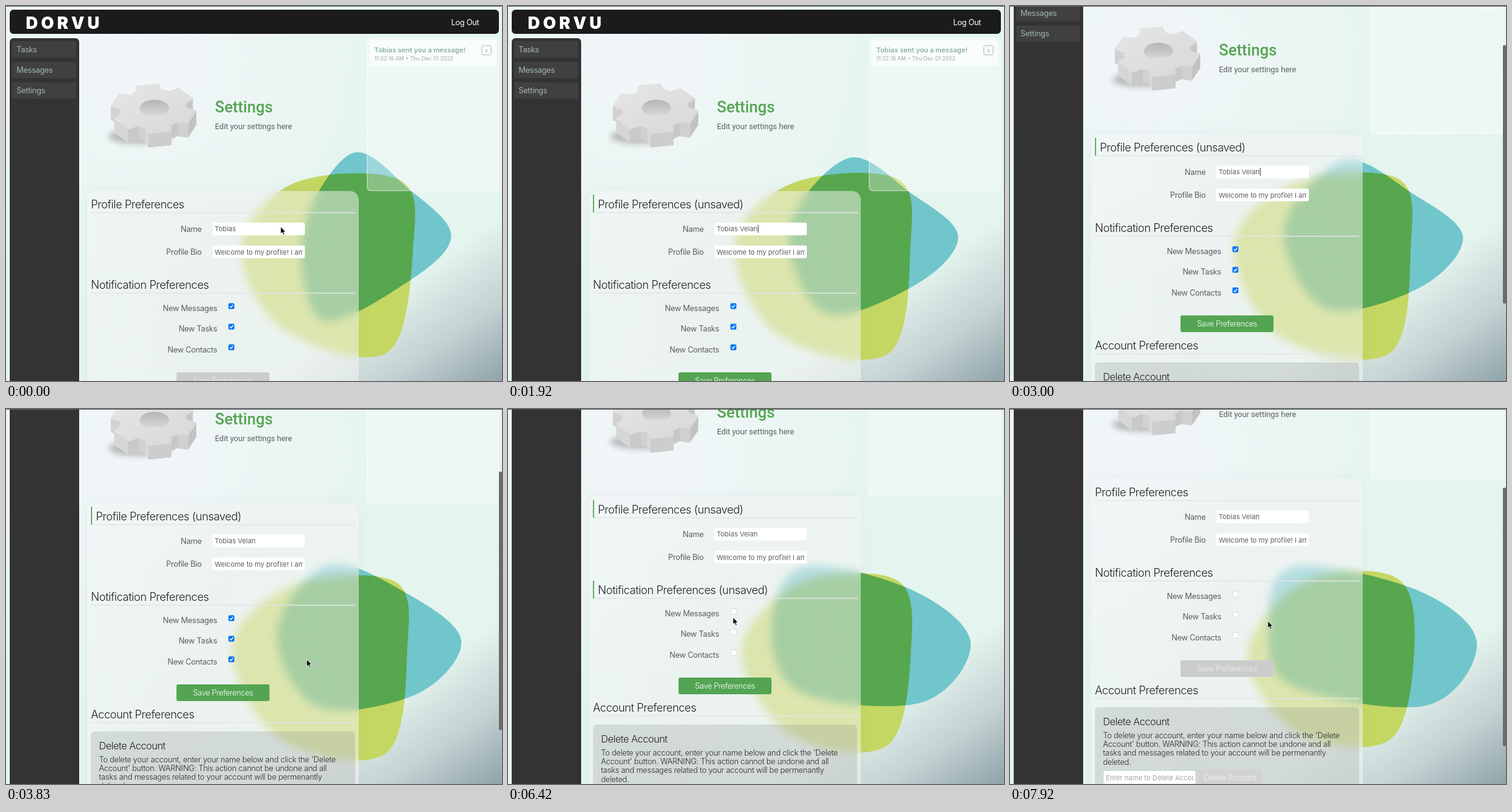
An HTML page for the animation above (8 s loop, 800x606 px).

```html
<!DOCTYPE html>
<html lang="en">
<head>
<meta charset="utf-8">
<title>Settings</title>
<style>
  html, body { margin: 0; width: 100%; height: 100%; overflow: hidden; }
  body {
    position: relative;
    background:
      radial-gradient(circle at 220px 90px, #f2f6f9, #f2f6f900 420px),
      linear-gradient(145deg, #e6f6f0 0, #e4f4ee 77%, #c3d1d2 89%, #8fa3a9 100%);
  }
  svg, .box { position: absolute; left: 0; top: 0; }
  #blobs { isolation: isolate; }
  #blobs path { mix-blend-mode: multiply; }
  #page { position: absolute; left: 0; top: 0; width: 800px; height: 878px; }
  #header { left: 5.5px; top: 6px; width: 789.5px; height: 39px; border-radius: 6px; background: #1b1b1b; }
  #sidebar { left: 5.5px; top: 52px; width: 112.5px; height: 826px; border-radius: 6px; background: #333; }
  #panel {
    left: 131px; top: 299px; width: 438px; height: 580px; border-radius: 14px;
    background: linear-gradient(100deg, #f4f6f785, #eff0f085 40%, #f3f4f385);
    backdrop-filter: blur(7px);
    box-shadow: 0 0 22px #70888814;
  }
  #notices {
    left: 582px; top: 52px; width: 211px; height: 245px; border-radius: 6px;
    background: #ffffff4d; border: 1px solid #ffffff99;
  }
  #topline { left: 0; top: 0; width: 100%; height: 1px; background: #505557; }
  #thumb { left: 795px; width: 5px; height: 418px; border-radius: 3px; background: #686c6d; }

  text { font: 12.6px Inter, sans-serif; letter-spacing: -.025em; fill: #5a5f60; white-space: pre; }
  .brand { font-size: 27px; font-weight: 900; letter-spacing: 5px; fill: #fff; }
  .white { fill: #fff; }
  .nav text { fill: #a2b4b1; }
  .heading { font-family: Roboto, sans-serif; font-size: 25.2px; font-weight: 500; letter-spacing: 0; fill: #54a553; }
  .lead { font-family: Roboto, sans-serif; letter-spacing: 0; }
  .title { font-size: 18px; font-weight: 300; letter-spacing: -.026em; fill: #222; }
  .subtitle { font-size: 16px; font-weight: 300; letter-spacing: -.03em; fill: #222; }
  .warning text { font-weight: 300; letter-spacing: -.02em; fill: #2b2b2b; }
  .label { text-anchor: end; }
  .field { font-size: 11px; letter-spacing: 0; }
  .button { font-weight: 300; letter-spacing: -.03em; text-anchor: middle; }
  .notice { font-size: 11px; font-weight: 600; letter-spacing: 0; fill: #8cafa8; }
  .stamp { font-size: 8.7px; letter-spacing: 0; fill: #9ab2af; }
  .rule { stroke: #e4e5e5; stroke-width: 1.5; }
  .bar, .section tspan { display: none; }
  .unsaved .bar, .unsaved tspan { display: inline; }
  .unsaved .title { transform: translateX(8px); }
  .unsaved .rule { transform: translateX(1.5px); }
</style>
</head>
<body>
<svg id="blobs" width="800" height="606">
  <path id="yellow" fill="#c5d763"/>
  <path id="teal" fill="#71c6cb"/>
</svg>

<div id="page">
  <div class="box" id="header"></div>
  <div class="box" id="sidebar"></div>
  <div class="box" id="panel"></div>
  <div class="box" id="notices"></div>
  <svg width="800" height="878">
    <defs>
      <linearGradient id="face" x1="0" y1="0" x2="1" y2="1">
        <stop stop-color="#e6e6e6"/><stop offset="1" stop-color="#d8d8d8"/>
      </linearGradient>
      <linearGradient id="bore" x1="0" y1="0" x2="0" y2="1">
        <stop stop-color="#b5b5b5"/><stop offset=".75" stop-color="#d0d0d0"/><stop offset="1" stop-color="#e2e4e4"/>
      </linearGradient>
      <filter id="soft" x="-30%" y="-80%" width="160%" height="260%"><feGaussianBlur stdDeviation="5"/></filter>
      <g id="checkbox">
        <rect x=".5" y=".5" width="9" height="9" rx="2" fill="#fff" stroke="#d2d5d6" stroke-width=".8"/>
      </g>
      <g id="tick">
        <rect width="9.6" height="9.6" rx="2" fill="#0a78f5"/>
        <path d="M2.4 5 4.2 7 7.4 2.6" fill="none" stroke="#fff" stroke-width="1.3"/>
      </g>
    </defs>

    <text class="brand" x="32" y="37">DORVU</text>
    <text class="white" x="718" y="30.5">Log Out</text>
    <g class="nav">
      <path fill="#404040" d="M10 57h103v26.500h-103zM10 90h103v26.500h-103zM10 123.300h103v26.500h-103z"/>
      <text x="17" y="74.500">Tasks</text>
      <text x="17" y="108">Messages</text>
      <text x="17" y="141">Settings</text>
    </g>

    <rect x="586" y="55" width="205" height="42" rx="3" fill="#fff" opacity=".6"/>
    <text class="notice" x="594" y="74.500">Tobias sent you a message!</text>
    <text class="stamp" x="594" y="88">11:32:16 AM • Thu Dec 01 2022</text>
    <rect x="767.500" y="64" width="15" height="15" rx="2.500" fill="none" stroke="#a3c0ba"/>
    <text class="stamp" x="772.700" y="74.500">x</text>

    <ellipse cx="211" cy="211" rx="46" ry="12" fill="#777" opacity=".45" filter="url(#soft)"/>
    <g id="gear" stroke-width="3" stroke-linejoin="round"></g>
    <ellipse cx="239.500" cy="165.500" rx="23.500" ry="14" fill="url(#bore)"/>

    <text class="heading" x="337" y="171.500">Settings</text>
    <text class="lead" x="337" y="199">Edit your settings here</text>

    <g class="section" id="profile">
      <path class="bar" d="M137 305h1.800v29h-1.800z" fill="#54a553"/>
      <text class="title" x="137" y="326.500">Profile Preferences<tspan> (unsaved)</tspan></text>
      <path class="rule" d="M137 334H563"/>
    </g>
    <text class="label" x="315.500" y="365">Name</text>
    <text class="label" x="315.500" y="402">Profile Bio</text>
    <rect x="333" y="350" width="149" height="20.500" rx="2.500" fill="#fff"/>
    <rect x="333" y="387" width="149" height="20.500" rx="2.500" fill="#fff"/>
    <text class="field" id="name" x="336.500" y="364.300"></text>
    <rect id="caret" y="353.500" width="1" height="13" fill="#333"/>
    <svg x="336" y="387" width="142.500" height="21"><text class="field" x=".500" y="14.500">Welcome to my profile! I am new here</text></svg>

    <g class="section" id="notify">
      <path class="bar" d="M137 435.500h1.800v29h-1.800z" fill="#54a553"/>
      <text class="title" x="137" y="456.500">Notification Preferences<tspan> (unsaved)</tspan></text>
      <path class="rule" d="M137 464H563"/>
    </g>
    <text class="label" x="340.500" y="493">New Messages</text>
    <text class="label" x="340.500" y="526">New Tasks</text>
    <text class="label" x="340.500" y="559.500">New Contacts</text>
    <use href="#checkbox" x="358.700" y="480.200"/><use href="#tick" id="tickMessages" x="358.700" y="480.200"/>
    <use href="#checkbox" x="358.700" y="513.400"/><use href="#tick" id="tickTasks" x="358.700" y="513.400"/>
    <use href="#checkbox" x="358.700" y="546.700"/><use href="#tick" id="tickContacts" x="358.700" y="546.700"/>

    <rect id="save" x="275" y="592" width="150" height="27" rx="3"/>
    <text class="button" id="saveLabel" x="350" y="610">Save Preferences</text>

    <text class="title" x="137" y="646.500">Account Preferences</text>
    <path class="rule" d="M137 654H563"/>
    <rect x="137" y="668" width="426" height="200" rx="6" fill="#707878" opacity=".2"/>
    <text class="subtitle" x="150" y="696.500">Delete Account</text>
    <g class="warning">
      <text x="150" y="717.500">To delete your account, enter your name below and click the 'Delete</text>
      <text x="150" y="732">Account' button. WARNING: This action cannot be undone and all</text>
      <text x="150" y="746.300">tasks and messages related to your account will be permenantly</text>
      <text x="150" y="760.600">deleted.</text>
    </g>
    <rect x="151" y="771" width="148" height="20.500" rx="2.500" fill="#fff"/>
    <svg x="154" y="771" width="142.500" height="21"><text class="field" x=".500" y="14.500" style="fill:#a5a5a5">Enter name to Delete Account</text></svg>
    <rect x="304" y="769" width="102" height="26" rx="3" fill="#d0cccc" opacity=".6"/>
    <text class="button" x="355" y="786" style="fill:#f3f3f3">Delete Account</text>
  </svg>
</div>

<div class="box" id="thumb"></div>
<svg id="cursor" width="14" height="18">
  <path d="M1 .8V12L3.600 9.700 5.300 13.600 7.200 12.800 5.500 9H9z" fill="#000" stroke="#fff" stroke-width=".8"/>
</svg>
<div class="box" id="topline"></div>

<script>
const $ = id => document.getElementById(id);
const LOOP = 8000, STEP = 1000 / 12, POSE_TIME = 2640;

// Six outline points per pose, clockwise from the right.
const yellowPoses = [
  [657,385, 615,560, 447,522, 379,390, 465,286, 635,281],
  [646,390, 612,563, 432,535, 360,385, 455,287, 625,279],
  [649,380, 612,550, 452,530, 371,385, 468,283, 628,278],
  [652,390, 612,535, 462,522, 383,395, 478,278, 625,274]
];
const tealPoses = [
  [718,370, 655,441, 510,507, 479,365, 558,238, 650,296],
  [729,373, 660,453, 512,492, 444,360, 545,249, 650,305],
  [741,377, 665,470, 488,467, 430,360, 488,256, 645,291],
  [753,377, 672,479, 455,447, 417,355, 455,256, 655,292]
];

const lerp = (a, b, k) => a + (b - a) * k;

// Tracks are [time, ...values] rows.
function track(rows, t) {
  const i = rows.findIndex(row => row[0] > t);
  if (i === 0) return rows[0].slice(1);
  if (i < 0) return rows.at(-1).slice(1);
  const [a, b] = [rows[i - 1], rows[i]];
  const k = (t - a[0]) / (b[0] - a[0]);
  return a.slice(1).map((v, j) => lerp(v, b[j + 1], k));
}

const scrollTrack = [[2250, 0], [2583, 35], [3000, 92], [3420, 132], [3833, 147.5], [4170, 158], [7600, 158], [7917, 186]];
const cursorTrack = [
  [3300, 443, 357], [3700, 485, 405], [4150, 485, 405], [4600, 364, 362], [4800, 364, 362],
  [5100, 364, 387], [5600, 364, 387], [6050, 363, 328], [6200, 363, 328], [6417, 363, 337],
  [6500, 363, 337], [6950, 352, 445], [7350, 352, 445], [7917, 416, 343]
];

// Closed Catmull-Rom curve through the interpolated pose.
function blobPath(poses, t) {
  const at = Math.min(t / POSE_TIME, 2.999), i = Math.floor(at);
  const flat = poses[i].map((v, j) => lerp(v, poses[i + 1][j], at - i));
  const point = n => { const m = (n + 6) % 6 * 2; return [flat[m], flat[m + 1]]; };
  let d = 'M' + point(0);
  for (let n = 0; n < 6; n++) {
    const [a, b, c, e] = [-1, 0, 1, 2].map(o => point(n + o));
    const lead = b.map((v, j) => v + (c[j] - a[j]) / 6);
    const tail = c.map((v, j) => v - (e[j] - b[j]) / 6);
    d += `C${lead} ${tail} ${c}`;
  }
  return d + 'z';
}

function drawGear() {
  const outline = [], depth = 22;
  for (let tooth = 0; tooth < 6; tooth++)
    for (const [turn, r] of [[-22, .76], [-15, .98], [15, .98], [22, .76]]) {
      const a = (21 + tooth * 60 + turn) * Math.PI / 180;
      outline.push([238 + 69 * r * Math.cos(a), 166 + 40 * r * Math.sin(a)]);
    }
  const shape = (points, fill) => `<polygon points="${points.join(' ')}" fill="${fill}" stroke="${fill}"/>`;
  const walls = outline.map((p, i) => {
    const q = outline[(i + 1) % outline.length];
    const tone = Math.round(206 - 14 * (q[1] - p[1]) / Math.hypot(q[0] - p[0], q[1] - p[1]));
    const quad = [p, q, [q[0], q[1] + depth], [p[0], p[1] + depth]];
    return { y: p[1] + q[1], svg: shape(quad, `rgb(${tone},${tone},${tone})`) };
  }).sort((a, b) => a.y - b.y);
  $('gear').innerHTML = walls.map(w => w.svg).join('') + shape(outline, 'url(#face)');
}

const show = (id, on) => { $(id).style.display = on ? '' : 'none'; };

function render(t) {
  $('yellow').setAttribute('d', blobPath(yellowPoses, t));
  $('teal').setAttribute('d', blobPath(tealPoses, t));

  const [scroll] = track(scrollTrack, t);
  $('page').style.top = -scroll + 'px';
  $('thumb').style.top = 1.3 + scroll * .676 + 'px';
  show('thumb', (t > 2300 && t < 4200) || t > 7600);

  const typed = Math.max(0, Math.min(6, Math.floor((t - 900) / 120) + 1));
  $('name').textContent = 'Tobias' + ' Velan'.slice(0, typed);
  $('caret').setAttribute('x', 337 + $('name').getComputedTextLength());
  show('caret', t > 400 && t < 3500);

  const saved = t >= 7100;
  const profileDirty = typed > 0 && !saved;
  $('profile').classList.toggle('unsaved', profileDirty);
  $('notify').classList.toggle('unsaved', t >= 4700 && !saved);
  $('save').style.fill = profileDirty ? '#54a553' : '#cbcdcd';
  $('saveLabel').style.fill = profileDirty ? '#fff' : '#ececec';
  show('tickTasks', t < 4700);
  show('tickContacts', t < 5300);
  show('tickMessages', t < 6150);

  const [x, y] = track(cursorTrack, t);
  $('cursor').style.transform = `translate(${x - 1}px, ${y - 1}px)`;
  show('cursor', t < 900 || t > 3300);
}

function frame() {
  const t = performance.now() % LOOP;
  render(Math.floor(t / STEP + .1) * STEP);
  requestAnimationFrame(frame);
}

drawGear();
frame();
</script>
</body>
</html>
```
